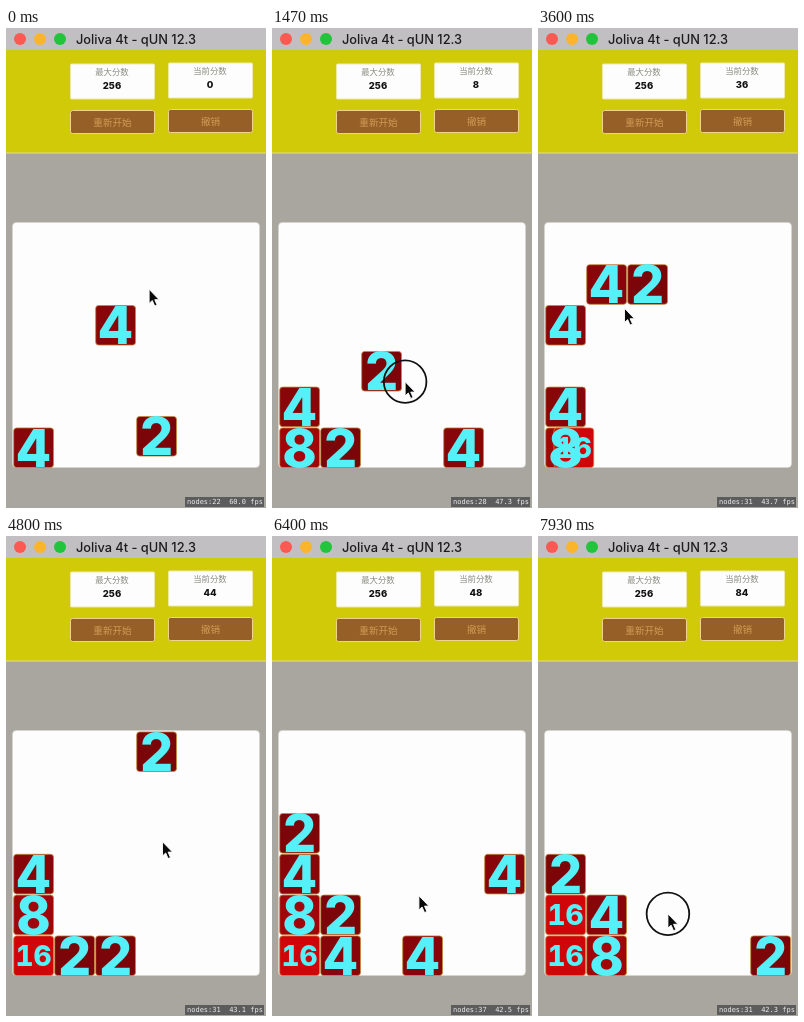
These frames come from a looping animation (260 px wide and 480 px high, 8000 ms). An HTML page:

```html
<!DOCTYPE html>
<html lang="zh">
<head>
<meta charset="utf-8">
<title>Sliding tiles</title>
<style>
html, body { margin: 0; width: 100%; height: 100%; overflow: hidden; background: #a9a6a0; }
svg { display: block; width: 100vw; height: 100vh; }
text { font-family: Inter, "Noto Sans CJK SC", "Noto Sans CJK", sans-serif; text-anchor: middle; }
.caption { font-size: 8.4px; font-weight: 300; fill: #8b8b80; }
.score { font-size: 9.5px; font-weight: 800; fill: #111; }
.action { font-size: 9.6px; font-weight: 300; fill: #cf9c55; }
.card { fill: #fdfdfd; stroke: #efe9a8; }
.button { fill: #965f28; stroke: #ecd58a; }
.digit { font-weight: 800; fill: #56f0f8; font-variant-numeric: tabular-nums; }
.stats { font: 7px "DejaVu Sans Mono", monospace; fill: #ececec; text-anchor: start; white-space: pre; }
</style>
</head>
<body>
<svg viewBox="0 0 260 480" preserveAspectRatio="none">
  <rect width="260" height="480" fill="#a9a6a0"/>
  <rect y="22" width="260" height="103" fill="#d0ca08"/>
  <rect y="124.5" width="260" height="1" fill="#e6df83"/>
  <rect width="260" height="22" fill="#c1bfc2"/>
  <circle cx="14" cy="11" r="6" fill="#fb5a52"/>
  <circle cx="34" cy="11" r="6" fill="#fbb52c"/>
  <circle cx="54" cy="11" r="6" fill="#22c43c"/>
  <text x="130" y="16" font-size="12.8" font-weight="500" fill="#1c1c1c">Joliva 4t - qUN 12.3</text>

  <rect class="card" x="64.5" y="36" width="84" height="35" rx="1"/>
  <rect class="card" x="162.5" y="35" width="84" height="35" rx="1"/>
  <text class="caption" x="106" y="47">最大分数</text>
  <text class="caption" x="204" y="46">当前分数</text>
  <text class="score" x="106" y="61">256</text>
  <text class="score" x="204" y="60" id="score">0</text>
  <rect class="button" x="64.5" y="82.5" width="84" height="23" rx="2"/>
  <rect class="button" x="162.5" y="81.5" width="84" height="23" rx="2"/>
  <text class="action" x="106.5" y="97.5">重新开始</text>
  <text class="action" x="204.5" y="96.5">撤销</text>

  <rect x="6.5" y="194.5" width="247" height="245" rx="4" fill="#fdfdfd" stroke="#d9d7cc" stroke-width=".6"/>
  <g id="tiles"></g>
  <g id="digits"></g>

  <rect x="179" y="469" width="79" height="10" fill="#5d5c5c"/>
  <text class="stats" x="181" y="476.3" id="stats"></text>
  <g id="cursor">
    <circle id="ring" r="21.3" fill="none" stroke="#111" stroke-width="1.8"/>
    <path d="M0 0V14.2L3.2 11.3L5.6 16.8L8 15.8L5.6 10.4H10Z" fill="#0a0a0a" stroke="#fff" stroke-width=".9"/>
  </g>
</svg>
<script>
const LOOP = 8000, FPS = 15, SLIDE = 300, SIZE = 6;
const $ = id => document.getElementById(id);

// Each move: direction, then column, row and value of the tile it adds
const moves = "d224 l004 d222 d454 l324 l514 l212 d122 d302 l122 d314 d534 l122 d552 l302".split(" ");
// Pace of play: move number, time
const pace = [[0, -216], [3, 1354], [5, 2600], [6, 3360], [8, 4490], [11, 6090], [14, 7990]];
// Where the hand rests: time, x, y
const rests = [[0, 133, 232], [1470, 133, 312], [2600, -21, 367], [3600, 110, 288],
  [4800, 129, 296], [6400, 139, 350], [8000, 102, 378]];

const linear = k => k;
const smooth = k => k * k * (3 - 2 * k);

// Interpolates the values that follow the first entry of each key.
function follow(keys, at, ease) {
  const i = Math.max(1, keys.findIndex(key => key[0] >= at));
  const [a, ...from] = keys[i - 1], [b, ...to] = keys[i];
  const k = ease((at - a) / (b - a));
  return from.map((v, n) => v + (to[n] - v) * k);
}

// Slides every tile; a merging tile takes its new value at once and covers the resting one.
function slide(tiles, left) {
  const moving = [];
  let gain = 0;
  for (let line = 0; line < SIZE; line++) {
    const row = tiles
      .filter(t => (left ? t.y : t.x) === line)
      .sort((a, b) => left ? a.x - b.x : b.y - a.y);
    let slot = 0, prev = null;
    for (const t of row) {
      const merge = prev && prev.v === t.v;
      const at = merge ? slot - 1 : slot++;
      const v = merge ? t.v * 2 : t.v;
      const m = { v, x0: t.x, y0: t.y, x: left ? at : line, y: left ? line : SIZE - 1 - at };
      if (merge) {
        gain += v;
        prev.covered = true;
      }
      moving.push(m);
      prev = merge ? null : m;
    }
  }
  return { moving, gain };
}

function play() {
  let tiles = [{ v: 4, x: 0, y: 5 }, { v: 2, x: 3, y: 4 }], score = 0;
  return moves.map(([dir, ...added], i) => {
    const left = dir === "l", [x, y, v] = added.map(Number);
    const { moving, gain } = slide(tiles, left);
    moving.push({ v, x0: x, y0: y, x, y });
    tiles = moving.filter(m => !m.covered);
    score += gain;
    return { time: follow(pace, i, linear)[0], left, moving, score };
  });
}
const turns = play();

function tileRect(v, x, y) {
  return `<rect x="${x + .5}" y="${y + .5}" width="39.8" height="39.6" rx="3" fill="rgb(${112 + 6 * v},5,9)" stroke="#c08a3c" stroke-width=".8"/>`;
}
function tileDigit(v, x, y) {
  const wide = v > 9;
  return `<text class="digit" x="${x + 20.4}" y="${y + (wide ? 30.4 : 39.2)}" font-size="${wide ? 28 : 52}">${v}</text>`;
}

// Every swipe pulls back a little, then flicks along its direction.
function pointerAt(t) {
  let [x, y] = follow(rests, t, smooth);
  for (const { time, left } of turns) {
    const s = (t - time) / 130, flick = 70 * s * Math.exp(-s * s / 2);
    if (left) x -= flick;
    else y += flick;
  }
  return [x, y];
}

function draw(t) {
  const turn = turns.filter(s => s.time <= t).pop();
  const k = Math.min(1, (t - turn.time) / SLIDE);
  const shown = turn.moving.filter(m => k < 1 || !m.covered);
  const place = (m, make) => make(m.v,
    7.2 + 41 * (m.x + (m.x0 - m.x) * (1 - k)),
    195.4 + 40.8 * (m.y + (m.y0 - m.y) * (1 - k)));
  $("tiles").innerHTML = shown.map(m => place(m, tileRect)).join("");
  $("digits").innerHTML = [...shown].reverse().map(m => place(m, tileDigit)).join("");
  $("score").textContent = turn.score;
  const rate = 41 + 19 / (1 + 2 * Math.floor(t / 1000));
  $("stats").textContent = `nodes:${13 + 3 * shown.length}  ${rate.toFixed(1)} fps`;
  $("cursor").setAttribute("transform", `translate(${pointerAt(t)})`);
  const pressed = turns.some(s => Math.abs(t - s.time) < 120);
  $("ring").setAttribute("visibility", pressed ? "visible" : "hidden");
}

const start = performance.now();
function tick() {
  const t = (performance.now() - start) % LOOP;
  const step = Math.floor((t + 4) * FPS / 1000) % (LOOP * FPS / 1000);
  draw(step * 1000 / FPS);
  requestAnimationFrame(tick);
}
tick();
</script>
</body>
</html>
```
